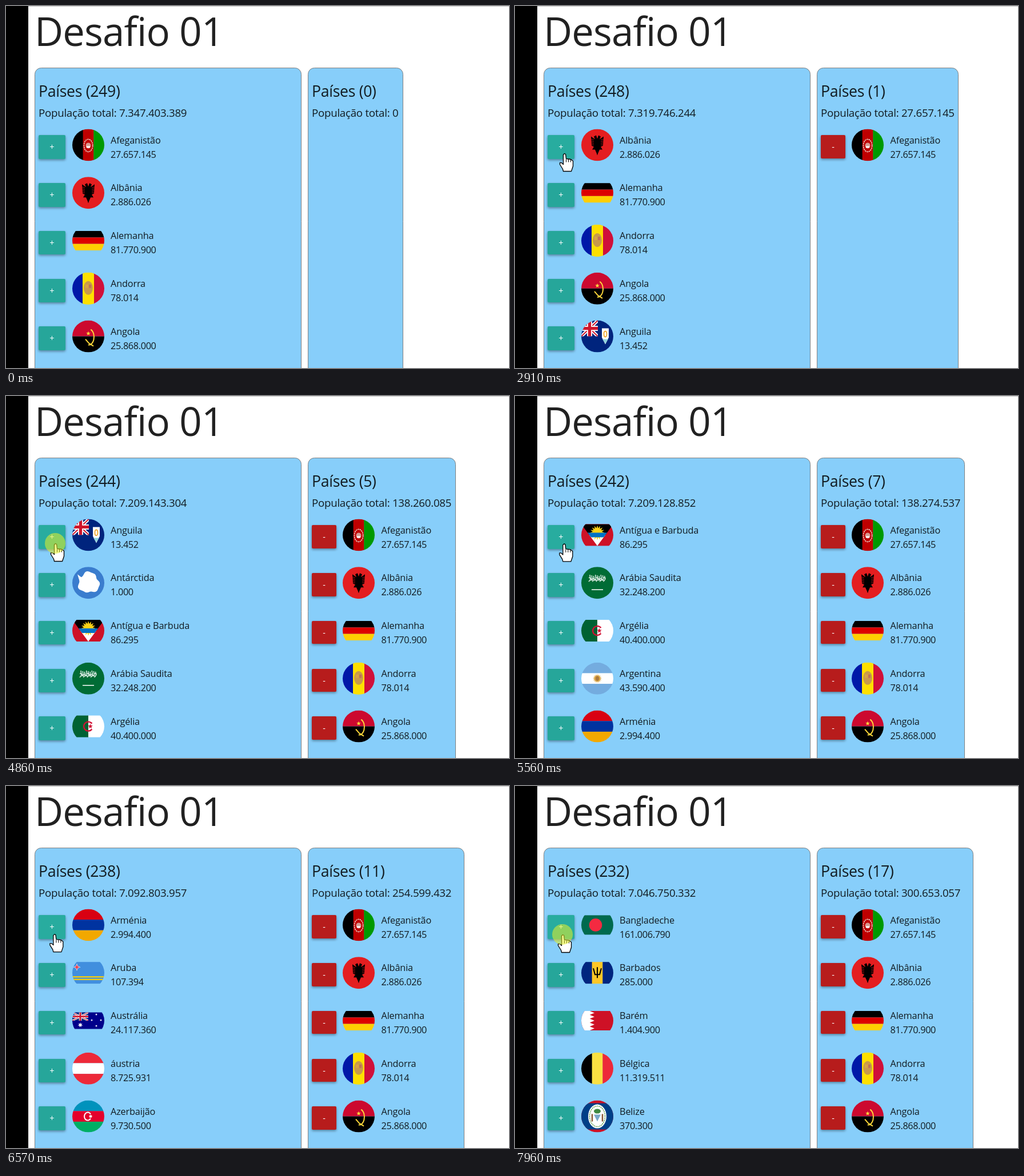
An HTML page with a canvas that plays this animation: 880x634 px, repeating every 8 s.

```html
<!DOCTYPE html>
<html lang="pt">
<head>
<meta charset="utf-8">
<title>Desafio 01</title>
<style>
html, body { margin: 0; width: 100%; height: 100%; overflow: hidden; background: #fff; }
canvas { display: block; }
</style>
</head>
<body>
<canvas id="stage" width="880" height="634"></canvas>
<script>
const ctx = document.getElementById('stage').getContext('2d');
const LOOP = 8000, ROW = 83.8, TOTAL = 7347403389, TAU = Math.PI * 2;
const INK = 'rgba(0,0,0,.87)';

// ---- drawing helpers ----
function rect(c, x, y, w, h) { ctx.fillStyle = c; ctx.fillRect(x, y, w, h); }
function oval(c, x, y, rx, ry = rx) {
  ctx.fillStyle = c; ctx.beginPath(); ctx.ellipse(x, y, rx, ry, 0, 0, TAU); ctx.fill();
}
function ring(c, lw, x, y, rx, ry = rx, from = 0, to = TAU, dash = []) {
  ctx.strokeStyle = c; ctx.lineWidth = lw; ctx.setLineDash(dash);
  ctx.beginPath(); ctx.ellipse(x, y, rx, ry, 0, from, to); ctx.stroke();
  ctx.setLineDash([]);
}
function trace(p) {
  ctx.beginPath();
  for (let i = 0; i < p.length; i += 2) ctx.lineTo(p[i], p[i + 1]);
}
function line(c, lw, ...p) { ctx.strokeStyle = c; ctx.lineWidth = lw; trace(p); ctx.stroke(); }
function poly(c, ...p) { ctx.fillStyle = c; trace(p); ctx.fill(); }
function polar(c, x, y, steps, radius) {
  const p = [];
  for (let i = 0; i < steps; i++) {
    const a = i / steps * TAU - TAU / 4, r = radius(i, a);
    p.push(x + r * Math.cos(a), y + r * Math.sin(a));
  }
  poly(c, ...p);
}
const star = (c, x, y, r, n = 5, inner = .42) => polar(c, x, y, 2 * n, i => i % 2 ? r * inner : r);

function text(s, x, y, size, gap, color = INK) {
  ctx.font = `${size}px "Open Sans", "Noto Sans", sans-serif`;
  ctx.letterSpacing = gap * size + 'px';
  ctx.fillStyle = color;
  ctx.fillText(s, x, y);
}

// ---- flags, centred on 0,0 inside a 56 px disc ----
const rows = (h, ...c) => c.forEach((k, i) => rect(k, -28, -h / 2 + i * h / c.length, 56, h / c.length));
const cols = (h, ...c) => c.forEach((k, i) => rect(k, -28 + i * 56 / c.length, -h / 2, 56 / c.length + .3, h));

function unionJack(x, y, w, h) {
  ctx.save();
  ctx.beginPath(); ctx.rect(x, y, w, h); ctx.clip();
  rect('#00247d', x, y, w, h);
  for (const [c, k] of [['#fff', .2], ['#cf142b', .07]]) {
    line(c, h * k, x, y, x + w, y + h);
    line(c, h * k, x + w, y, x, y + h);
  }
  for (const [c, k] of [['#fff', .32], ['#cf142b', .19]]) {
    rect(c, x + (w - h * k) / 2, y, h * k, h);
    rect(c, x, y + h * (1 - k) / 2, w, h * k);
  }
  ctx.restore();
}

function eagle() {
  for (const side of [1, -1]) {
    ctx.save(); ctx.scale(side, 1);
    poly('#000', -.3, -10, 2, -17, 6, -15, 4, -10, 11, -15, 10, 1, 6, 3, 9, 8, 4, 8, -.3, 18);
    for (let y = -10; y < 0; y += 3) line('#e41e20', .7, 6, y + 1, 12, y);
    ctx.restore();
  }
}

const flags = [
  ['Afeganistão', 27657145, () => {
    cols(56, '#000', '#bf0000', '#009900');
    ring('#ead5cd', 1.6, 0, 1, 7.6, 11, 0, TAU, [2.5, 1]);
    oval('#d89a90', 0, 1, 4.5, 5);
    rect('#fff', -3, 2, 6, 3);
  }],
  ['Albânia', 2886026, () => { rows(56, '#e41e20'); eagle(); }],
  ['Alemanha', 81770900, () => rows(34, '#000', '#dd0000', '#ffce00')],
  ['Andorra', 78014, () => {
    cols(56, '#0018a8', '#fedf00', '#d0103a');
    rect('#fedf00', -10, -28, 20, 56);
    oval('#c99a4a', 0, -1, 8, 12);
    rect('#d9a441', -5, -7, 5, 6); rect('#c0705a', 1, -7, 4, 6);
  }],
  ['Angola', 25868000, () => {
    rows(56, '#cc092f', '#000');
    ring('#ffd83a', 2, 1, 1, 9, 14, -1.2, 1.7);
    line('#ffd83a', 2, -5, 5, 1, 12, 9, 17);
    star('#ffd83a', 0, -5, 4);
  }],
  ['Anguila', 13452, () => {
    rows(56, '#00247d'); unionJack(-28, -28, 29, 28);
    poly('#fff', 8, -14, 20, -14, 20, 2, 14, 14, 8, 2);
    poly('#8fd4de', 9, 5, 19, 5, 14, 13);
    ring('#f0a52a', 1.8, 14, -4, 2.5, 5);
  }],
  ['Antárctida', 1000, () => {
    rows(56, '#3a7dce');
    polar('#fff', 1, 0, 60, (i, a) => 18 + 1.8 * Math.sin(3 * a) + Math.cos(7 * a));
    poly('#fff', -19, -15, -15, -2, -10, -8);
  }],
  ['Antígua e Barbuda', 86295, () => {
    rows(38, '#ce1126');
    ctx.save(); trace([-28, -19, 28, -19, 0, 19]); ctx.clip();
    rows(38, '#000', '#fff');
    star('#fcd116', 0, -4, 13, 16, .62);
    rect('#0072c6', -28, -4, 56, 8);
    ctx.restore();
  }],
  ['Arábia Saudita', 32248200, () => {
    rows(56, '#006c35');
    for (let i = 0; i < 9; i++) {
      const x = -13 + i * 3.2;
      line('#fff', 1.3, x, -14 + i % 3, x + 1, -6, x - 2, -2 - i % 2 * 2);
      line('#fff', 1.2, x - 2, -9 + i % 4, x + 2, -8 + i % 2 * 4);
    }
    line('#fff', 1.5, -10, 12, 10, 12);
  }],
  ['Argélia', 40400000, () => {
    cols(38, '#006233', '#fff');
    ring('#d21034', 2.4, 0, 0, 8, 8, .65, 5.63);
    star('#d21034', 3.5, 0, 4.5);
  }],
  ['Argentina', 43590400, () => {
    rows(56, '#74acdf', '#fff', '#74acdf');
    star('#d9a441', 0, 0, 8, 16, .6); oval('#a9793f', 0, 0, 3, 4);
  }],
  ['Arménia', 2994400, () => rows(56, '#d90012', '#0033a0', '#f2a800')],
  ['Aruba', 107394, () => {
    rows(38, '#418fde');
    for (const y of [6, 10.5]) rect('#ffd100', -28, y, 56, 2.2);
    star('#fff', -20, -10, 6.5, 4, .38); star('#ef3340', -20, -10, 5.2, 4, .32);
  }],
  ['Austrália', 24117360, () => {
    rows(29, '#00008b'); unionJack(-28, -14.5, 28, 14.5);
    star('#fff', -14, 7.5, 4.5, 7);
    for (let i = 0; i < 4; i++) star('#fff', 14 + 8 * Math.sin(i * TAU / 4), -1 - 10 * Math.cos(i * TAU / 4), 2.1, 7);
  }],
  ['áustria', 8725931, () => rows(56, '#ed2939', '#fff', '#ed2939')],
  ['Azerbaijão', 9730500, () => {
    rows(56, '#0092bc', '#e4002b', '#00ae65');
    ring('#fff', 2, -1, 0, 6, 7, .6, 5.68); star('#fff', 4, 0, 3.5, 8, .5);
  }],
  ['Baamas', 378040, () => {
    rows(56, '#00a9ce', '#fae042', '#00a9ce');
    poly('#000', -28, -28, -4, 0, -28, 28);
  }],
  ['Bangladeche', 161006790, () => { rows(34, '#006a4e'); oval('#f42a41', -3, 0, 11.3); }],
  ['Barbados', 285000, () => {
    cols(38, '#00267f', '#ffc726', '#00267f');
    line('#000', 2, 0, -10, 0, 9);
    line('#000', 2, -7, -8, -4, 3, 4, 3, 7, -8);
  }],
  ['Barém', 1404900, () => {
    rows(34, '#ce1126'); rect('#fff', -28, -17, 15, 34);
    for (let y = -17; y < 16; y += 6.8) poly('#fff', -13.2, y, -5, y + 3.4, -13.2, y + 6.8);
  }],
  ['Bélgica', 11319511, () => cols(56, '#000', '#fae042', '#ed2939')],
  ['Belize', 370300, () => {
    rows(56, '#ce1126'); rect('#003f87', -28, -23, 56, 46);
    oval('#fff', 0, 0, 16, 21);
    ring('#5b9b4c', 1.5, 0, 0, 13.5, 18, 0, TAU, [2, 1.2]);
    oval('#3f8a43', 0, -9, 6, 4);
    poly('#79a9c9', -6, -3, 6, -3, 0, 9);
    for (const x of [-9, 9]) line('#8a5a35', 2.5, x, -4, x, 9);
  }]
];

// ---- timing: two slow clicks, then a steady fast rhythm ----
const BEAT = 258.3;
const clicks = Array.from({ length: 18 }, (_, i) => {
  const slow = i < 2, down = slow ? 2510 + 785 * i : 4085 + BEAT * (i - 2);
  const lag = slow ? 400 : BEAT;
  return { down, up: down + .58 * lag, moved: down + lag };
});
const path = [[740, 467, 387], [820, 306, 214], [1050, 306, 214], [1150, 39, 47], [1360, 39, 47],
  [1670, 111, 264], [1820, 110, 264], [2130, 69, 244], [2280, 86, 258], [4860, 86, 258], [LOOP, 83, 260]];

function pointer(t) {
  const i = path.findIndex(k => k[0] > t);
  if (i < 1) return null;
  const [a, b] = [path[i - 1], path[i]], k = (t - a[0]) / (b[0] - a[0]);
  return [1, 2].map(j => a[j] + (b[j] - a[j]) * k);
}

// ---- page parts ----
const LEFT = { x: 57, w: 47, h: 41.5, flag: 144, text: 183, color: '#26a69a', label: '+' };
const RIGHT = { x: 535, w: 43, h: 40.6, flag: 617, text: 656.5, color: '#b71c1c', label: '-' };
const dots = n => String(n).replace(/\B(?=(\d{3})+$)/g, '.');
const sum = list => list.reduce((s, f) => s + f[1], 0);

function panel(x, w, count, people) {
  ctx.beginPath(); ctx.roundRect(x + .5, 108.5, w - 1, 560, 11);
  ctx.fillStyle = '#87cefa'; ctx.fill();
  ctx.strokeStyle = '#808080'; ctx.lineWidth = 1; ctx.stroke();
  text(`Países (${count})`, x + 7, 159, 26.7, -.0128);
  text('População total: ' + dots(people), x + 7, 194, 18.72, -.0145);
}

function button(side, i, color) {
  const y = 226.2 + i * ROW, top = Math.round(y), bottom = Math.round(y + side.h);
  ctx.save();
  ctx.shadowColor = 'rgba(0,0,0,.38)'; ctx.shadowBlur = 4; ctx.shadowOffsetY = 2;
  ctx.fillStyle = color;
  ctx.beginPath(); ctx.roundRect(side.x, top, side.w, bottom - top, 2); ctx.fill();
  ctx.restore();
  ctx.textAlign = 'center';
  text(side.label, side.x + side.w / 2, top + 26, 14.5, 0, '#fff');
  ctx.textAlign = 'left';
}

function country([name, people, draw], i, side, color = side.color) {
  button(side, i, color);
  ctx.save();
  ctx.translate(side.flag, 243.4 + i * ROW);
  ctx.beginPath(); ctx.arc(0, 0, 28, 0, TAU); ctx.clip();
  draw();
  ctx.restore();
  const base = Math.round(240.6 + i * ROW);
  text(name, side.text, base, 16.3, -.01);
  text(dots(people), side.text, base + 25, 16.3, -.022);
}

function cursor(x, y, hand) {
  ctx.save(); ctx.translate(x + .5, y + .5);
  ctx.fillStyle = '#fff'; ctx.strokeStyle = '#000'; ctx.lineWidth = 1.3; ctx.lineJoin = 'round';
  trace(hand
    ? [-2, 2, 0, 0, 2, 1, 3, 9, 11, 10, 15, 13, 15, 22, 12, 31, -2, 31, -3, 27, -8, 19, -8, 16, -5, 16, -2, 19]
    : [0, 0, 0, 30, 7, 24, 12, 35, 16.5, 33.5, 11.5, 22.5, 21.5, 22.5]);
  ctx.closePath(); ctx.fill(); ctx.stroke();
  if (hand) for (const k of [3, 7, 11]) line('#000', 1, k, 10, k, 15);
  ctx.restore();
}

function render(t) {
  const n = clicks.filter(c => c.moved <= t + 1).length;
  const moved = flags.slice(0, n), gone = sum(moved);
  const edge = n === 0 ? 695 : n < 3 ? 776 : n < 8 ? 787 : 802;
  const at = pointer(t);
  const over = at && at[0] >= 57 && at[0] < 104 && at[1] >= 226 && at[1] < 268;

  rect('#fff', 0, 0, 880, 634);
  rect('#c4c4c4', 39, 0, 841, 1);
  rect('#000', 0, 0, 39, 634);
  text('Desafio 01', 50, 70, 68.8, -.012, '#212121');

  panel(50, 467, 249 - n, TOTAL - gone);
  panel(528, edge - 528, n, gone);
  flags.slice(n, n + 5).forEach((f, i) => country(f, i, LEFT, over && i === 0 ? '#28ac9f' : LEFT.color));
  moved.slice(0, 5).forEach((f, i) => country(f, i, RIGHT));

  if (!at) return;
  cursor(...at, over);
  if (clicks.some(c => c.down <= t + 1 && t < c.up)) oval('rgba(230,240,40,.55)', ...at, 18);
}

const start = performance.now();
function tick() {
  render((performance.now() - start) % LOOP);
  requestAnimationFrame(tick);
}
tick();
</script>
</body>
</html>
```
